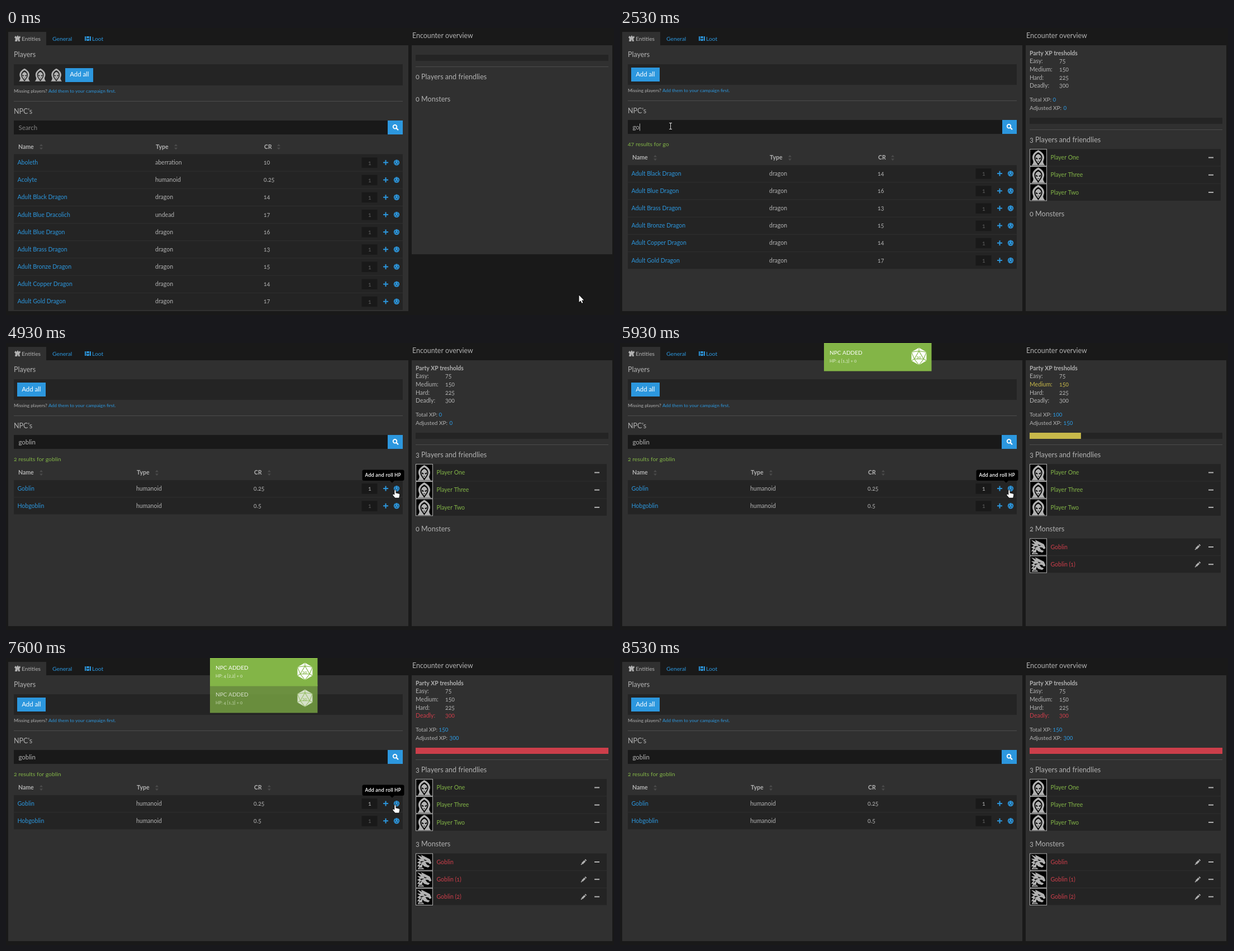
An HTML page with a canvas that plays this animation: 1088x515 px, repeating every 9340 ms.

```html
<!DOCTYPE html>
<html lang="en">
<head>
<meta charset="utf-8">
<title>Encounter builder</title>
<style>
html, body { margin: 0; width: 100%; height: 100%; overflow: hidden; background: #191919; }
canvas { display: block; font-feature-settings: "onum"; }
</style>
</head>
<body>
<canvas id="stage" width="1088" height="515"></canvas>
<script>
const ctx = document.getElementById('stage').getContext('2d');
const LOOP = 9340;
const PAGE = '#191919', PANEL = '#303030', ROW = '#242424', LINE = '#4c4c4c';
const TEXT = '#b2b2b2', BLUE = '#2c97de', GREEN = '#83b547', RED = '#cc3e4a', YELLOW = '#c8b94a';

// Moments of the story, in ms
const ADDED = 1262, FOCUS = 1860, BLUR = 4925, TIP = 4795, LEAVE = 7660, GONE = 8065;
const GOBLINS = [5065, 5865, 6725];
const KEYS = [[2395, 'g'], [2525, 'go'], [2665, 'gob'], [3065, 'gobl'], [3265, 'gobli'], [3395, 'goblin']];
const TOASTS = [
  { start: 5865, end: 7535, roll: '[1,3]' },
  { start: 6725, end: 8285, roll: '[2,2]' }
];

const BEASTS = [
  ['Aboleth', 'aberration', '10'], ['Acolyte', 'humanoid', '0.25'],
  ['Adult Black Dragon', 'dragon', '14'], ['Adult Blue Dracolich', 'undead', '17'],
  ['Adult Blue Dragon', 'dragon', '16'], ['Adult Brass Dragon', 'dragon', '13'],
  ['Adult Bronze Dragon', 'dragon', '15'], ['Adult Copper Dragon', 'dragon', '14'],
  ['Adult Gold Dragon', 'dragon', '17']
];
const FOUND = [['Goblin', 'humanoid', '0.25'], ['Hobgoblin', 'humanoid', '0.5']];

const HOOD = new Path2D('M15 1.5C10 4 5 8 4.5 14C4.2 19 7 21 6 24C5 27 4 28 3 29H27C26 28 25 27 24 24C23 21 25.8 19 25.5 14C25 8 20 4 15 1.5Z');
const HOOD_GAP = new Path2D('M15 5.5C10 8 7.5 12 8 16C8.5 21 12 24 15 29C18 24 21.5 21 22 16C22.5 12 20 8 15 5.5Z');
const FACE = new Path2D('M15 8.5C11 10 9.5 13 9.7 16C10 20 13 23 15 25.5C17 23 20 20 20.3 16C20.5 13 19 10 15 8.5Z');
const EYES = new Path2D('M10.3 14.5L14.2 16.8L13 18.3L10.8 17.3ZM19.7 14.5L15.8 16.8L17 18.3L19.2 17.3ZM13 21.3H17L15 22.5Z');
const DRAGON = new Path2D('M2 2L11 6L9 2L17 6L25 10L28 17L25 19L22 16L17 15.5L20 20L25 22L22 25L15 23L12 20L11 24L15 28H3L6 23L2 23L6 18L2 16L7 13L2 9L9 9.5Z');
const DRAGON_CUTS = new Path2D('M14 10L20 12.5L16 13ZM8 14L15 13.5L9 16.5ZM6 20L11 17L8 21ZM6 25.5L12 25V26L6 26.5Z');
const ARROW = new Path2D('M0 0V12.5L2.9 9.8L4.9 14.3L6.8 13.4L4.8 9.1H8.7Z');
const HAND = new Path2D('M-1.2 1C-1.2 -.6 1 -.6 1 1V5L6.5 6.2C7.6 6.6 8 7.2 7.8 8.4L6.8 13.5H-.2L-4.2 8.6C-4.8 7.4 -3.2 6.6 -2.4 7.4L-1.2 8.5Z');

const clamp = v => Math.max(0, Math.min(1, v));
const ramp = (t, start, length) => clamp((t - start) / length);
const smooth = p => p * p * (3 - 2 * p);
const mix = (a, b, p) => a + (b - a) * p;

// CSS "ease" timing curve
function ease(x) {
  let lo = 0, hi = 1;
  for (let i = 0; i < 20; i++) {
    const s = (lo + hi) / 2, r = 1 - s;
    if (3 * r * r * s * .25 + 3 * r * s * s * .25 + s ** 3 < x) lo = s; else hi = s;
  }
  const r = 1 - lo;
  return 3 * r * r * lo * .1 + 3 * r * lo * lo + lo ** 3;
}

function box(x, y, w, h, color) {
  ctx.fillStyle = color;
  ctx.fillRect(x, y, w, h);
}

function text(str, x, y, size = 10.5, color = TEXT, weight = 400, family = 'Lato') {
  ctx.font = `${weight} ${size}px ${family}, sans-serif`;
  ctx.fillStyle = color;
  ctx.fillText(str, x, y + size * .35);
}

function at(x, y, scale, draw) {
  ctx.save();
  ctx.translate(x, y);
  ctx.scale(scale, scale);
  draw();
  ctx.restore();
}

function shape(path, color) {
  ctx.fillStyle = color;
  ctx.fill(path);
}

function stroke(color, width, ...points) {
  ctx.strokeStyle = color;
  ctx.lineWidth = width;
  ctx.beginPath();
  points.forEach(([x, y], i) => i ? ctx.lineTo(x, y) : ctx.moveTo(x, y));
  ctx.stroke();
}

function die(x, y, r, color, ink) {
  const corner = (i, q) => [x + q * Math.sin(i * Math.PI / 3), y - q * Math.cos(i * Math.PI / 3)];
  ctx.beginPath();
  for (let i = 0; i < 6; i++) ctx.lineTo(...corner(i, r));
  ctx.fillStyle = color;
  ctx.fill();
  const tri = [0, 2, 4].map(i => corner(i, r * .62));
  stroke(ink, r * .07, ...tri, tri[0]);
  tri.forEach((p, i) => [-1, 0, 1].forEach(d => stroke(ink, r * .07, p, corner(i * 2 + d, r))));
}

function rollIcon(x, y) {
  ctx.beginPath();
  ctx.arc(x, y, 5.2, 0, 7);
  ctx.fillStyle = BLUE;
  ctx.fill();
  for (const d of [-1, 1]) {
    box(x + d * 2.4 - .8, y - 1.4, 1.6, 1.6, ROW);
    box(x + d * 1.8 - .5, y - 4, 1, 1, ROW);
    box(x + d * 3.6 - .5, y + 1.2, 1, 1, ROW);
  }
  box(x - 1.5, y + 2, 3, 1, ROW);
}

function hood(x, y, scale, back) {
  at(x, y, scale, () => {
    shape(HOOD, TEXT);
    shape(HOOD_GAP, back);
    shape(FACE, TEXT);
    shape(EYES, back);
  });
}

function portrait(y, isMonster) {
  box(733, y - 15.5, 31, 31, TEXT);
  box(734, y - 14.5, 29, 29, '#000');
  if (!isMonster) return hood(733.5, y - 15, 1, '#000');
  at(733.5, y - 15, 1, () => { shape(DRAGON, TEXT); shape(DRAGON_CUTS, '#000'); });
}

function plus(x, y) {
  box(x - 4.5, y - 1, 9, 2, BLUE);
  box(x - 1, y - 4.5, 2, 9, BLUE);
}

function pencil(x, y) {
  stroke(TEXT, 3.2, [x - 3, y + 3], [x + 2, y - 2]);
  stroke(TEXT, 3.2, [x + 2.7, y - 2.7], [x + 4, y - 4]);
  stroke(TEXT, 1.6, [x - 5, y + 5], [x - 3, y + 3]);
}

function sorter(x, y) {
  for (const d of [-1, 1]) {
    ctx.beginPath();
    ctx.moveTo(x - 3, y + d * 1.5);
    ctx.lineTo(x + 3, y + d * 1.5);
    ctx.lineTo(x, y + d * 5);
    ctx.fillStyle = LINE;
    ctx.fill();
  }
}

function tabs() {
  box(4, 7, 68, 25, PANEL);
  at(15, 13, 1, () => {
    shape(new Path2D('M0 4L2 1L4 3L6 0L8 3L10 1L11 4L9 6L10 11H7L6 7L5 11H1L2 6Z'), TEXT);
  });
  text('Entities', 28, 19, 10.3);
  text('General', 83, 19, 10.3, BLUE);
  box(141, 15, 11, 8, BLUE);
  box(143, 15, 1, 8, PAGE);
  box(149, 15, 1, 8, PAGE);
  box(144, 18, 5, 1, PAGE);
  box(146, 18, 1, 3, PAGE);
  text('Loot', 154, 19, 10.3, BLUE);
}

function beastRow([name, type, cr], y, columns, active) {
  box(14, y - 15, 696, 30.2, ROW);
  text(name, 20.5, y, 10.5, BLUE);
  text(type, columns[0] - 1, y);
  text(cr, columns[1] - 1, y);
  box(636.5, y - 9, 28, 18.5, PAGE);
  text('1', 648, y + .5, 10.5, active ? TEXT : '#5c5c5c');
  plus(679.5, y);
  rollIcon(699, y);
}

function npcTable(query, shift) {
  const few = query.length > 2;
  const columns = few ? [234, 444] : [268, 462];
  const arrows = few ? [63, 270, 471] : [63, 304, 488];
  let rows = BEASTS;
  if (few) rows = FOUND;
  else if (query) rows = BEASTS.filter(b => b[0].includes('Dragon'));
  const top = query ? 232.7 : 213 - shift * 1.3;
  if (query) text(`${few ? 2 : query === 'g' ? 118 : 47} results for ${query}`, 14, 208, 10.4, GREEN);
  ['Name', 'Type', 'CR'].forEach((label, i) => {
    text(label, i ? columns[i - 1] : 22, top, 10.5, TEXT, 700);
    sorter(arrows[i], top + .3);
  });
  rows.forEach((row, i) => beastRow(row, top + 28.4 + i * 31.17, columns, few && !i));
}

function leftPanel(t, query, mouse) {
  const added = t >= ADDED, shift = added ? 1 : 0;
  const focused = t >= FOCUS && t < BLUR;
  box(4, 31, 716, 477, PANEL);
  tabs();
  text('Players', 14, 48, 12.5);
  box(14, 65, 696, 38 - shift, ROW);
  if (!added) [20.5, 49, 77.5].forEach(x => hood(x, 71.5, .84, ROW));
  const hover = ramp(t, 985, 110) * (1 - ramp(t, 1335, 130));
  const x = added ? 20 : 106;
  box(x, 72 - shift, 50 + shift, 25, `rgb(${mix(44, 36, hover)},${mix(151, 126, hover)},${mix(222, 187, hover)})`);
  text('Add all', x + 8.2, 83.3, 11.4, '#fff');

  const onLink = mouse && mouse.x > 76 && mouse.x < 195 && Math.abs(mouse.y - 113) < 5;
  text('Missing players?', 14, 113.5 - shift, 8.4);
  text('Add them to your campaign first.', 76, 113.5 - shift, 8.4, onLink ? '#2278b2' : BLUE);
  box(14, 131 - shift, 696, 1, LINE);
  text("NPC's", 14, 149.3 - shift, 12.5);

  box(14, 166 - shift, 670, 25, PAGE);
  text(query || 'Search', 22.5, 179 - shift, 11.4, query ? TEXT : '#828282');
  if (focused) {
    const caret = 23 + (query ? ctx.measureText(query).width : 0);
    box(Math.round(caret), 171.5, 1, 13, TEXT);
  }
  const edge = focused ? 684 : 683;
  box(edge, 166 - shift, 710 - edge, 25, BLUE);
  ctx.beginPath();
  ctx.arc(696, 177.3 - shift, 3.3, 0, 7);
  ctx.strokeStyle = '#fff';
  ctx.lineWidth = 1.8;
  ctx.stroke();
  stroke('#fff', 2.2, [698.5, 179.8 - shift], [702, 183.3 - shift]);

  ctx.save();
  ctx.beginPath();
  ctx.rect(4, 190, 716, 318);
  ctx.clip();
  npcTable(query, shift);
  ctx.restore();
}

function memberRow(name, y, color, isMonster) {
  box(733, y - 15.3, 342, 30.3, ROW);
  portrait(y, isMonster);
  text(name, 770.5, y, 10.5, color);
  box(1053, y - 1, 9, 2, TEXT);
  if (isMonster) pencil(1034, y);
}

function difficultyBar(t, y) {
  box(733, y, 345, 11, ROW);
  const levels = [0, 1 / 6, .5, 1];
  let width = 0, color;
  GOBLINS.forEach((start, i) => {
    if (t < start) return;
    width = mix(levels[i], levels[i + 1], ease(ramp(t, start - 55, 600)));
    color = ['#808080', YELLOW, RED][i];
  });
  if (width) box(733, y, 345 * width, 11, color);
}

function rightPanel(t) {
  const added = t >= ADDED;
  const count = GOBLINS.filter(start => t >= start).length;
  text('Encounter overview', 727, 14, 12.4);
  box(726, 31, 359, added ? 477 : 375, PANEL);
  if (added) {
    text('Party XP tresholds', 733, 45, 10.4, TEXT, 700);
    ['Easy', 'Medium', 'Hard', 'Deadly'].forEach((level, i) => {
      const color = count === 2 && i === 1 ? YELLOW : count === 3 && i === 3 ? RED : TEXT;
      text(level + ':', 733, 59.7 + i * 14.7, 10.5, color);
      text(String(75 * (i + 1)), 786, 59.7 + i * 14.7, 10.5, color);
    });
    text('Total XP:', 733, 128.5, 10.1);
    text(String(count * 50), 774.5, 128.5, 10.5, BLUE);
    text('Adjusted XP:', 733, 143.3, 10.1);
    text(String([0, 50, 150, 300][count]), 793.5, 143.3, 10.5, BLUE);
  }
  const drop = added ? 113 : 0;
  difficultyBar(t, 48 + drop);
  box(733, 69 + drop, 345, 1, LINE);
  text(`${added ? 3 : 0} Players and friendlies`, 733, 87.3 + drop, 12.6);
  if (added) {
    ['One', 'Three', 'Two'].forEach((n, i) => memberRow('Player ' + n, 232.5 + i * 31.2, GREEN, false));
  }
  text(`${count} Monsters`, 733, added ? 333.3 : 128, 12.6);
  for (let i = 0; i < count; i++) {
    memberRow(i ? `Goblin (${i})` : 'Goblin', 366 + i * 31.2, RED, true);
  }
}

function toasts(t) {
  TOASTS.forEach(({ start, end, roll }, i) => {
    const alpha = Math.min(ramp(t, start - 40, 80), 1 - ramp(t, end, 240));
    if (t < start || alpha <= 0) return;
    const y = !i && t >= TOASTS[1].start ? 48 : 0;
    ctx.globalAlpha = alpha;
    box(365, y, 192.5, 50.5, GREEN);
    text('NPC ADDED', 375, y + 17, 10.1, '#fff');
    text(`HP: 4 ${roll} + 0`, 375, y + 32, 7.8, '#e2eed3');
    die(535, y + 24, 15.5, '#fff', GREEN);
    text('20', 530.5, y + 26, 7.5, GREEN, 700);
    ctx.globalAlpha = 1;
  });
}

function tooltip(t) {
  if (t < TIP || t >= LEAVE) return;
  ctx.globalAlpha = ramp(t, TIP - 60, 120);
  ctx.fillStyle = '#000';
  ctx.beginPath();
  ctx.roundRect(637.5, 227.5, 75, 19.5, 3);
  ctx.moveTo(687, 247);
  ctx.lineTo(695, 247);
  ctx.lineTo(691, 251);
  ctx.fill();
  text('Add and roll HP', 642.5, 237.3, 8.6, '#fff', 600, 'Open Sans');
  ctx.globalAlpha = 1;
}

function pointer(t) {
  if (t >= GONE) return null;
  const go = (a, b, p) => ({ x: mix(a.x, b.x, p), y: mix(a.y, b.y, p) });
  const rest = { x: 1025.5, y: 479.5 }, button = { x: 136.5, y: 90.5 };
  const field = { x: 90, y: 176 }, dip = { x: 480, y: 395 }, roll = { x: 696.5, y: 264.3 };
  if (t < ADDED) return go(rest, button, smooth(ramp(t, 30, 970)));
  if (t < 3900) return go(button, field, smooth(ramp(t, 1300, 570)));
  if (t < 7600) {
    const p = smooth(ramp(t, 3900, 900));
    return go(go(field, dip, p), go(dip, roll, p), p);
  }
  return go(roll, { x: 142, y: 446 }, smooth(ramp(t, 7600, 465)));
}

function drawPointer({ x, y }) {
  if (x > 14 && x < 684 && y > 165 && y < 190) {
    stroke('#ddd', 1, [x + .5, y - 5], [x + .5, y + 5]);
    for (const d of [-5.5, 5.5]) stroke('#ddd', 1, [x - 2, y + d], [x + 3, y + d]);
    return;
  }
  const overDie = x > 691 && x < 705 && y > 250 && y < 272;
  at(x, y, 1, () => {
    const path = overDie ? HAND : ARROW;
    ctx.strokeStyle = '#000';
    ctx.lineWidth = 1.4;
    ctx.stroke(path);
    shape(path, '#fff');
  });
}

function draw(t) {
  const query = KEYS.reduce((typed, [time, str]) => t >= time ? str : typed, '');
  const mouse = pointer(t);
  box(0, 0, 1088, 515, PAGE);
  leftPanel(t, query, mouse);
  rightPanel(t);
  tooltip(t);
  toasts(t);
  if (mouse) drawPointer(mouse);
}

const begin = performance.now();
function tick() {
  draw((performance.now() - begin) % LOOP);
  requestAnimationFrame(tick);
}
tick();
</script>
</body>
</html>
```
